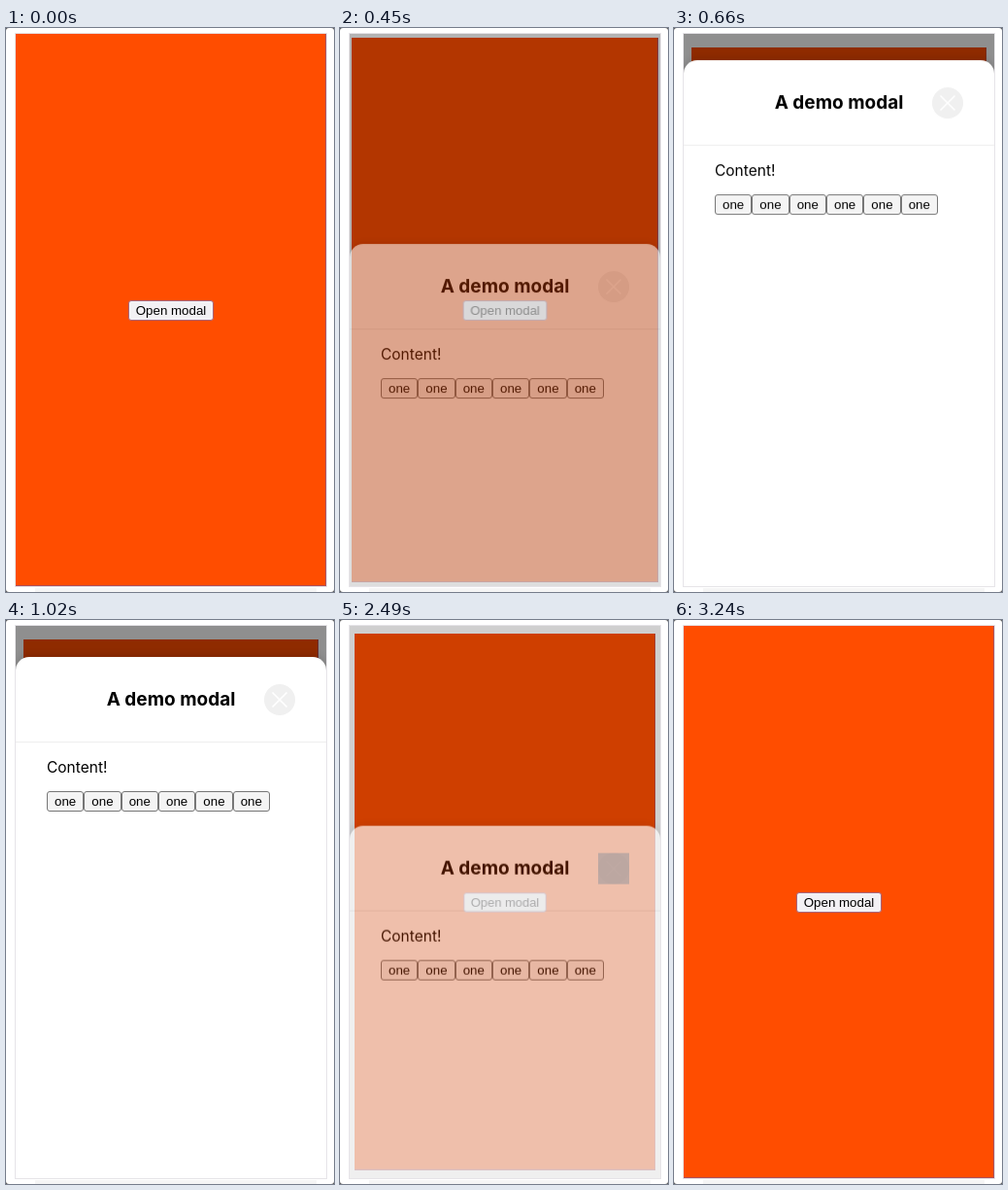
Recreate the animation shown at these times as an HTML page. Size 338x580 px, loop 3.3 s.

```html
<!DOCTYPE html>
<html lang="en">
<head>
<meta charset="utf-8">
<title>Modal demo</title>
<style>
  * { box-sizing: border-box; }
  html, body { margin: 0; width: 100%; height: 100%; overflow: hidden; background: #555; }
  #stage { position: relative; width: 338px; height: 580px; overflow: hidden; background: #fff; border-radius: 3px; }
  #stage div, #stage svg { position: absolute; }
  #ledge { left: 30px; top: 576px; width: 290px; height: 4px; background: #f5f5f5; }
  #rim { left: 9px; top: 5px; width: 322px; height: 570px; background: #e6e4e8; }
  #screen { left: 10px; top: 6px; width: 320px; height: 568px; overflow: hidden; background: #fff; }
  #card { inset: 0; background: #ff4d00; border: solid #b0505a; border-width: 0 1px 1px 0; }
  #shade { inset: 0; background: #000; opacity: 0; }
  .button {
    height: 21px; border: 1px solid #767676; border-radius: 3px; background: #f4f4f4; color: #000;
    font: 13.333px/19px "Liberation Sans", Arial, sans-serif; text-align: center; white-space: nowrap;
  }
  #open { left: 116px; top: 274px; width: 88px; border-color: #a8647a; background: #f3f1f4; }
  #modal {
    left: 0; top: 32px; width: 320px; height: 580px; opacity: 0; background: #fff; color: #000;
    border-radius: 14px 14px 0 0; box-shadow: 0 0 10px rgba(0, 0, 0, .18);
    font-family: Inter, sans-serif; will-change: transform;
  }
  #header { left: 0; top: 0; width: 320px; height: 88px; border-bottom: 1px solid #eee; }
  #title { left: 0; top: 32px; width: 320px; font-size: 19px; font-weight: 700; line-height: 24px; text-align: center; }
  #content { left: 32px; top: 104px; font-size: 15.5px; line-height: 20px; }
  #row { left: 32px; top: 138px; width: 230px; display: flex; }
  #stage #row .button { position: static; flex: 1; }
  #close { left: 256px; top: 28px; width: 32px; height: 32px; }
  #press { left: 256px; top: 28px; width: 32px; height: 32px; background: rgba(160, 212, 240, .75); opacity: 0; }
</style>
</head>
<body>
<div id="stage">
  <div id="ledge"></div>
  <div id="rim"></div>
  <div id="screen">
    <div id="card"><div id="open" class="button">Open modal</div></div>
    <div id="shade"></div>
    <div id="modal">
      <div id="header"></div>
      <div id="title">A demo modal</div>
      <svg id="close" viewBox="0 0 32 32">
        <circle cx="16" cy="16" r="16" fill="#f0f0f0"/>
        <path d="M8.5 8.5l15 15M23.5 8.5l-15 15" stroke="#fff" stroke-width="1.6"/>
      </svg>
      <div id="press"></div>
      <div id="content">Content!</div>
      <div id="row"></div>
    </div>
  </div>
</div>
<script>
const LOOP = 3300, TRAVEL = 536;
const SMOOTH = 'cubic-bezier(.333, 0, .667, 1)';
const el = id => document.getElementById(id);

for (let i = 0; i < 6; i++) {
  const button = document.createElement('div');
  button.className = 'button';
  button.textContent = 'one';
  el('row').append(button);
}

// Each step is [time in ms, value, easing towards the next step].
function play(id, property, steps) {
  const frames = steps.map(([time, value, easing = 'linear']) =>
    ({ offset: time / LOOP, [property]: value, easing }));
  el(id).animate(frames, { duration: LOOP, iterations: Infinity });
}

// Step response of a slightly underdamped spring.
function spring(ms, speed) {
  const x = Math.max(0, ms) / 1000 * speed;
  return 1 - Math.exp(-.8 * x) * (Math.cos(.6 * x) + 4 / 3 * Math.sin(.6 * x));
}

function modalTop(time) {
  if (time >= 1020 && time < 2381) return 0;
  const away = time < 1020 ? 1 - spring(time - 292, 12.2) : spring(time - 2381, 9.8);
  return away * TRAVEL;
}

const slide = [];
for (let time = 0; time <= LOOP; time += 15) {
  slide.push([time, `translateY(${modalTop(time).toFixed(2)}px)`]);
}
play('modal', 'transform', slide);

play('modal', 'opacity', [
  [0, 0], [315, 0, SMOOTH], [570, 1],
  [2395, 1, SMOOTH], [2645, 0], [LOOP, 0]
]);
play('shade', 'opacity', [
  [0, 0], [300, 0], [390, .17], [520, .44],
  [2385, .44], [2400, .405], [2570, 0], [LOOP, 0]
]);
play('card', 'transform', [
  [0, 'scale(1)'], [378, 'scale(1)', 'ease'], [765, 'scale(.95)'],
  [2393, 'scale(.95)', 'ease'], [2785, 'scale(1)'], [LOOP, 'scale(1)']
]);
play('press', 'opacity', [
  [0, 0, 'step-end'], [2395, 1, 'step-end'], [2520, 0, 'step-end'], [LOOP, 0]
]);
</script>
</body>
</html>
```
